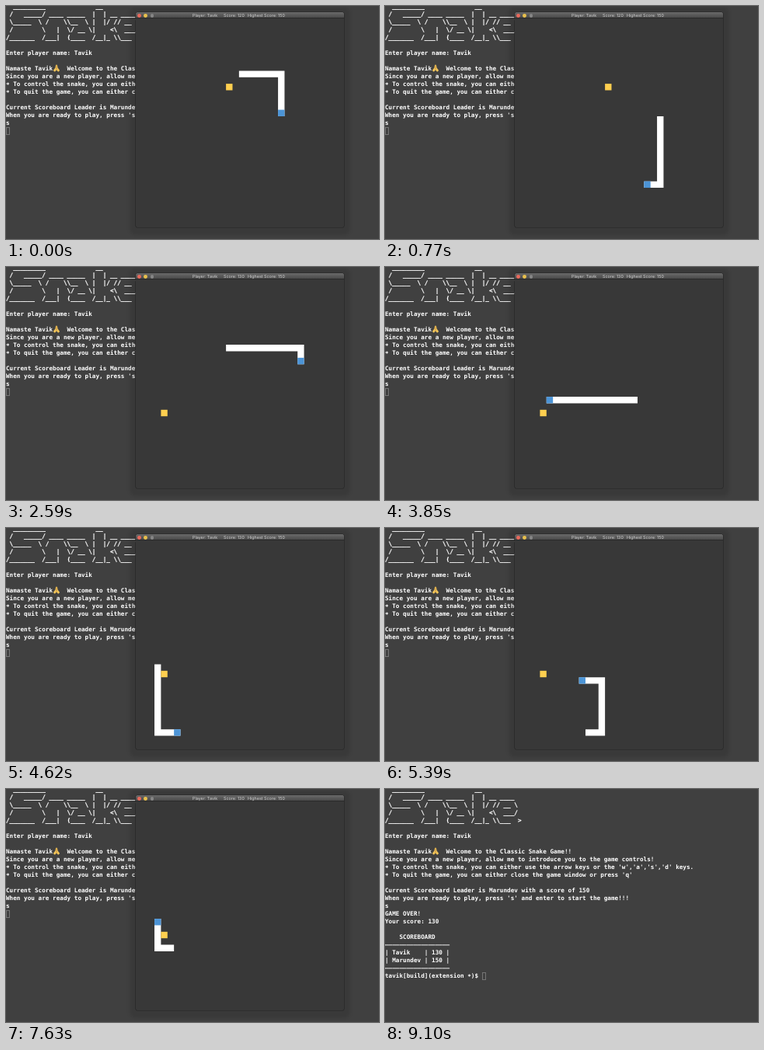
These frames come from a looping animation (480x300 px, 9870 ms). An HTML page:

```html
<!DOCTYPE html>
<html lang="en">
<head>
<meta charset="utf-8">
<title>Snake in the terminal</title>
<style>
  html, body { margin: 0; width: 100%; height: 100%; overflow: hidden; background: #404040; }
  body { position: relative; text-rendering: geometricPrecision; }
  pre {
    position: absolute; left: 0; top: -4px; margin: 0; color: #fff;
    font: bold 7.68px/10px "DejaVu Sans Mono", monospace;
  }
  .art { -webkit-text-stroke: .2px #fff; }
  .star { position: relative; top: 1.2px; }
  #end { display: none; }
  .cursor {
    display: inline-block; box-sizing: border-box; vertical-align: top;
    width: 5px; height: 10px; border: 1px solid #757575;
  }
  .hands { position: absolute; left: 60px; top: 75px; width: 10px; height: 10px; }
  #win {
    position: absolute; left: 166.5px; top: 8px; width: 268px; height: 276.5px;
    background: #383838; border-radius: 2.5px;
    box-shadow: 0 0 0 .6px #242424, 0 2px 4px 8px rgba(0, 0, 0, .11);
  }
  .bar {
    height: 8px; box-sizing: border-box; border-bottom: 1px solid #2a2a2a;
    border-radius: 2.5px 2.5px 0 0; background: linear-gradient(#6a6a6a, #4a4a4a);
    font: 5.4px/8px Inter, sans-serif; color: #d4d4d4; white-space: pre;
  }
  .bar span { position: absolute; top: .7px; }
  .bar i { position: absolute; top: 1.8px; width: 4.8px; height: 4.8px; border-radius: 50%; }
  #board { position: absolute; left: -166.5px; top: -8px; }
</style>
</head>
<body>
<pre>
<span class="art">  _________              __
 /   _____/ ____ _____  |  | __ ____
 \_____  \ /    \\__  \ |  |/ // __ \
 /        \   |  \/ __ \|    &lt;\  ___/
/_______  /___|  (____  /__|_ \\___  &gt;</span>

Enter player name: Tavik

Namaste Tavik    Welcome to the Classic Snake Game!!
Since you are a new player, allow me to introduce you to the game controls!
<span class="star">*</span> To control the snake, you can either use the arrow keys or the 'w','a','s','d' keys.
<span class="star">*</span> To quit the game, you can either close the game window or press 'q'

Current Scoreboard Leader is Marundev with a score of 150
When you are ready to play, press 's' and enter to start the game!!!
s
<span id="end">GAME OVER!
Your score: 130

    SCOREBOARD
––––––––––––––––––
| Tavik    | 130 |
| Marundev | 150 |
––––––––––––––––––
tavik[build](extension <span class="star">*</span>)$ </span><span class="cursor"></span></pre>

<svg class="hands" viewBox="0 0 10 10">
  <path d="M5 .3 6.1 1.6 6.6 4.4 9.2 8 7.2 9.7 5 7.6 2.8 9.7 .8 8 3.4 4.4 3.9 1.6z" fill="#f2c45a"/>
  <path d="M5 1.4V7.4" stroke="#a8762c" stroke-width=".6"/>
</svg>

<div id="win">
  <div class="bar">
    <i style="left:2.6px;background:#e9695c"></i>
    <i style="left:10.8px;background:#e8c04c"></i>
    <i style="left:19px;background:#868686"></i>
    <span style="left:73.5px">Player: Tavik</span>
    <span style="left:113.5px" id="score"></span>
    <span style="left:144.5px">Highest Score: 150</span>
  </div>
  <svg id="board" width="480" height="300">
    <g id="pieces">
      <polyline id="body" fill="none" stroke="#fff" stroke-linecap="square"/>
      <rect id="food" fill="#ffcf4f"/>
      <rect id="head" fill="#4c94d6"/>
    </g>
  </svg>
</div>

<script>
  const LOOP = 9870, TICK = 70, CELL = 8.37;
  const START = 12, EAT = 36;
  const CLEAR = 8540, OVER = 8890, FADE = 9030, CLOSED = 9100;
  const el = id => document.getElementById(id);

  // Corners of the route, in cells counted from the first piece of food.
  const corners = [
    [2, -2], [8, -2], [8, 15], [-1, 15], [-1, 0], [11, 0], [11, 8], [-11, 8], [-11, 19],
    [-1, 19], [-1, 11], [-11, 11], [-11, 8], [0, 8], [0, 12], [-11, 12], [-11, 8]
  ];
  // [ms, moves made]; flat stretches are short stalls.
  const pace = [
    [0, 0], [350, 7], [420, 7], [1540, 29], [1610, 29], [2590, 49], [2870, 55], [2940, 55],
    [3850, 75], [3990, 78], [4410, 88], [4480, 88], [5390, 109], [5530, 112], [6510, 132],
    [7070, 145], [7140, 145], [7840, 162]
  ];

  const route = [corners[0]];
  for (const [cx, cy] of corners.slice(1)) {
    let [x, y] = route[route.length - 1];
    while (x !== cx || y !== cy) {
      x += Math.sign(cx - x);
      y += Math.sign(cy - y);
      route.push([x, y]);
    }
  }

  const center = ([x, y]) => [287.3 + x * CELL, 104.3 + y * CELL];

  function place(node, cell) {
    const [x, y] = center(cell);
    node.setAttribute("x", x - CELL / 2);
    node.setAttribute("y", y - CELL / 2);
  }

  function movesAt(t) {
    const k = pace.findIndex(p => p[0] > t);
    if (k < 0) return pace[pace.length - 1][1];
    const [t0, m0] = pace[k - 1], [t1, m1] = pace[k];
    return Math.floor(m0 + (m1 - m0) * (t - t0) / (t1 - t0) + 1e-6);
  }

  function draw(t) {
    const moves = movesAt(t), fed = moves >= EAT;
    const at = moves + START, last = Math.min(at, route.length - 1);
    // Once the head stops, the body keeps following until it is all under it.
    const cells = route.slice(at - (fed ? 13 : 12), last + 1);
    el("body").setAttribute("points", cells.map(center).join(" "));
    place(el("head"), route[last]);
    place(el("food"), fed ? [-10, 10] : [0, 0]);
    el("score").textContent = "Score: " + (fed ? 130 : 120);
    el("pieces").style.display = t < CLEAR ? "" : "none";
    el("end").style.display = t < OVER ? "none" : "inline";
    el("win").style.opacity = t < FADE ? 1 : t < CLOSED ? .45 : 0;
  }

  el("body").setAttribute("stroke-width", CELL);
  for (const id of ["head", "food"]) {
    el(id).setAttribute("width", CELL);
    el(id).setAttribute("height", CELL);
  }

  function frame() {
    const t = performance.now() % LOOP;
    draw(Math.floor(t / TICK) * TICK);
    requestAnimationFrame(frame);
  }
  frame();
</script>
</body>
</html>
```
